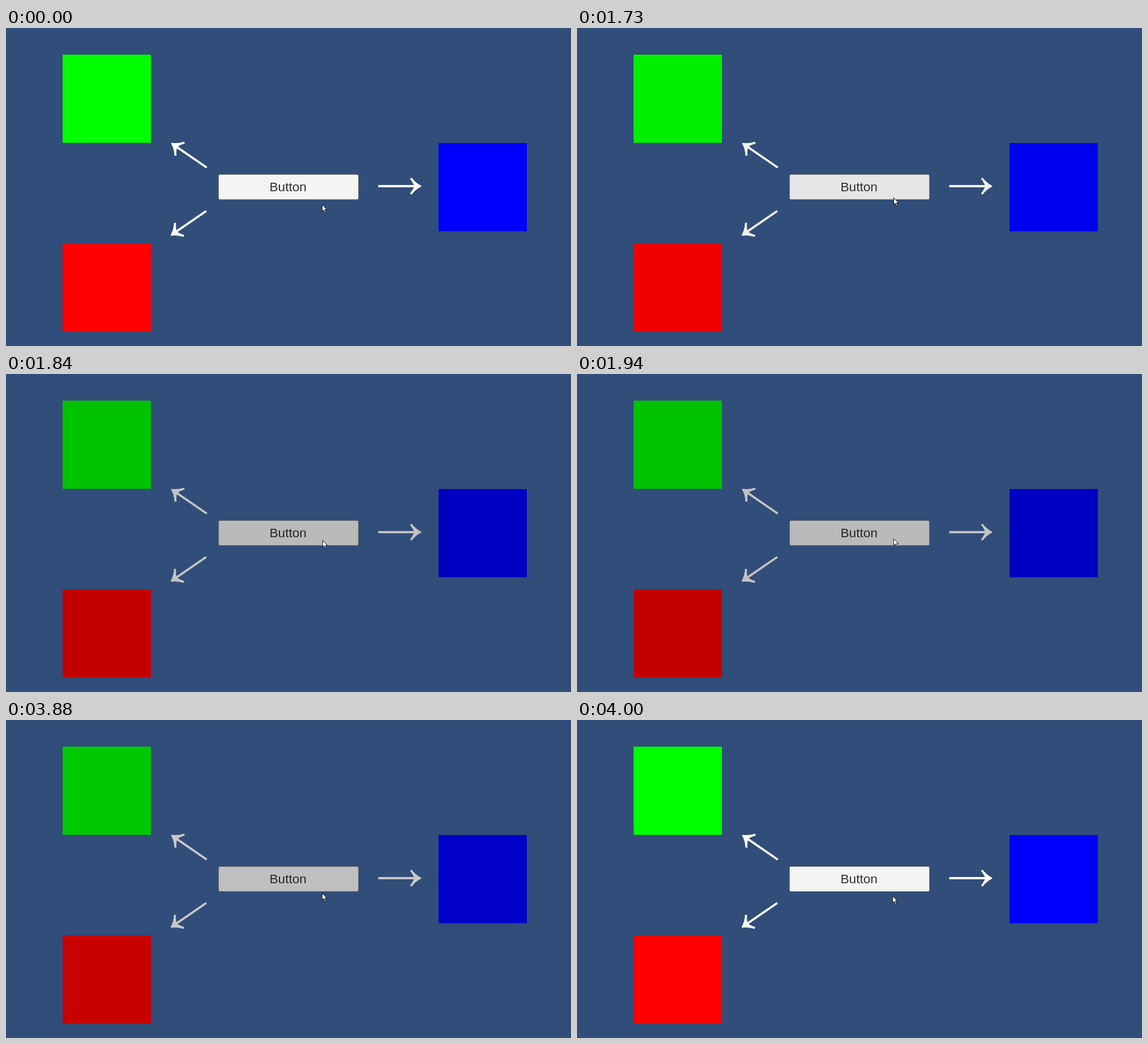
An HTML page with a canvas that plays this animation: 998x561 px, repeating every 4.69 s.

```html
<!DOCTYPE html>
<html lang="en">
<head>
<meta charset="utf-8">
<title>Button hover</title>
<style>
  html, body { margin: 0; width: 100%; height: 100%; overflow: hidden; background: #314d79; }
  canvas { display: block; }
</style>
</head>
<body>
<canvas id="stage" width="998" height="561"></canvas>
<script>
const ctx = document.getElementById('stage').getContext('2d');
const LOOP = 4690;
const TICK = 60;
const FADE = 100;
const ENTER = 1695;
const LEAVE = 3871;

const outside = { x: 558, y: 311 };
const inside = { x: 559, y: 290 };
const after = { x: 557, y: 310 };

const arrow = new Path2D(
  'M-76 -1.9 L-13 -1.9 Q-16 -8.5 -20 -13 L-17 -15 Q-10 -5.5 0 -0.8 L0 0.8 ' +
  'Q-10 5.5 -17 15 L-20 13 Q-16 8.5 -13 1.9 L-76 1.9 Z');
const pointer = new Path2D(
  'M0 0 L0 12 L2.7 9.5 L4.7 14.3 L6.6 13.5 L4.6 8.8 L8.2 8.8 Z');

// Linear progress from 0 to 1 between two times
const ramp = (t, from, to) => Math.min(1, Math.max(0, (t - from) / (to - from)));

const mix = (a, b, k) => Math.round(a + (b - a) * k);

const hoverAt = t => ramp(t, ENTER, ENTER + FADE) - ramp(t, LEAVE, LEAVE + FADE);

function pointerAt(t) {
  const leaving = t > LEAVE - 1000;
  const [a, b] = leaving ? [inside, after] : [outside, inside];
  const k = leaving ? ramp(t, 3580, 3980) : ramp(t, 1480, 1900);
  return [mix(a.x, b.x, k), mix(a.y, b.y, k)];
}

function tint(rgb, hover) {
  const k = 1 - 0.237 * hover;
  return `rgb(${rgb.map(v => Math.round(v * k)).join(',')})`;
}

const gray = (v, hover) => tint([v, v, v], hover);

function drawSquare(x, y, rgb, hover) {
  ctx.fillStyle = tint(rgb, hover);
  ctx.fillRect(x, y, 156, 155.6);
}

function drawArrow(x, y, angle, hover) {
  ctx.save();
  ctx.translate(x, y);
  ctx.rotate(angle);
  ctx.fillStyle = gray(255, hover);
  ctx.fill(arrow);
  ctx.restore();
}

function drawButton(hover) {
  ctx.beginPath();
  ctx.roundRect(375.5, 258.5, 247, 44, 2.5);
  ctx.fillStyle = gray(244, hover);
  ctx.fill();
  ctx.lineWidth = 1;
  ctx.strokeStyle = tint([135, 134, 132], hover);
  ctx.stroke();

  ctx.font = '22.6px "Liberation Sans", Arial, sans-serif';
  ctx.textAlign = 'center';
  ctx.fillStyle = gray(50, hover);
  ctx.fillText('Button', 498.2, 288);
}

function drawPointer(x, y) {
  ctx.save();
  ctx.translate(x + 0.5, y + 0.5);
  ctx.lineWidth = 1;
  ctx.fillStyle = '#fff';
  ctx.strokeStyle = '#101418';
  ctx.fill(pointer);
  ctx.stroke(pointer);
  ctx.restore();
}

function draw(time) {
  // The picture advances in held ticks
  const t = Math.floor((time - 40) / TICK) * TICK + 40;
  const hover = hoverAt(t);

  ctx.fillStyle = '#314d79';
  ctx.fillRect(0, 0, 998, 561);

  drawSquare(100, 47, [0, 255, 0], hover);
  drawSquare(764, 203, [0, 0, 255], hover);
  drawSquare(100, 380, [255, 0, 0], hover);

  const slant = Math.atan2(43, 62.5);
  drawArrow(733.5, 279, 0, hover);
  drawArrow(292, 203.2, Math.PI + slant, hover);
  drawArrow(291.2, 365.8, Math.PI - slant, hover);

  drawButton(hover);
  drawPointer(...pointerAt(t));
}

const start = performance.now();

function tick() {
  draw((performance.now() - start) % LOOP);
  requestAnimationFrame(tick);
}

tick();
</script>
</body>
</html>
```
